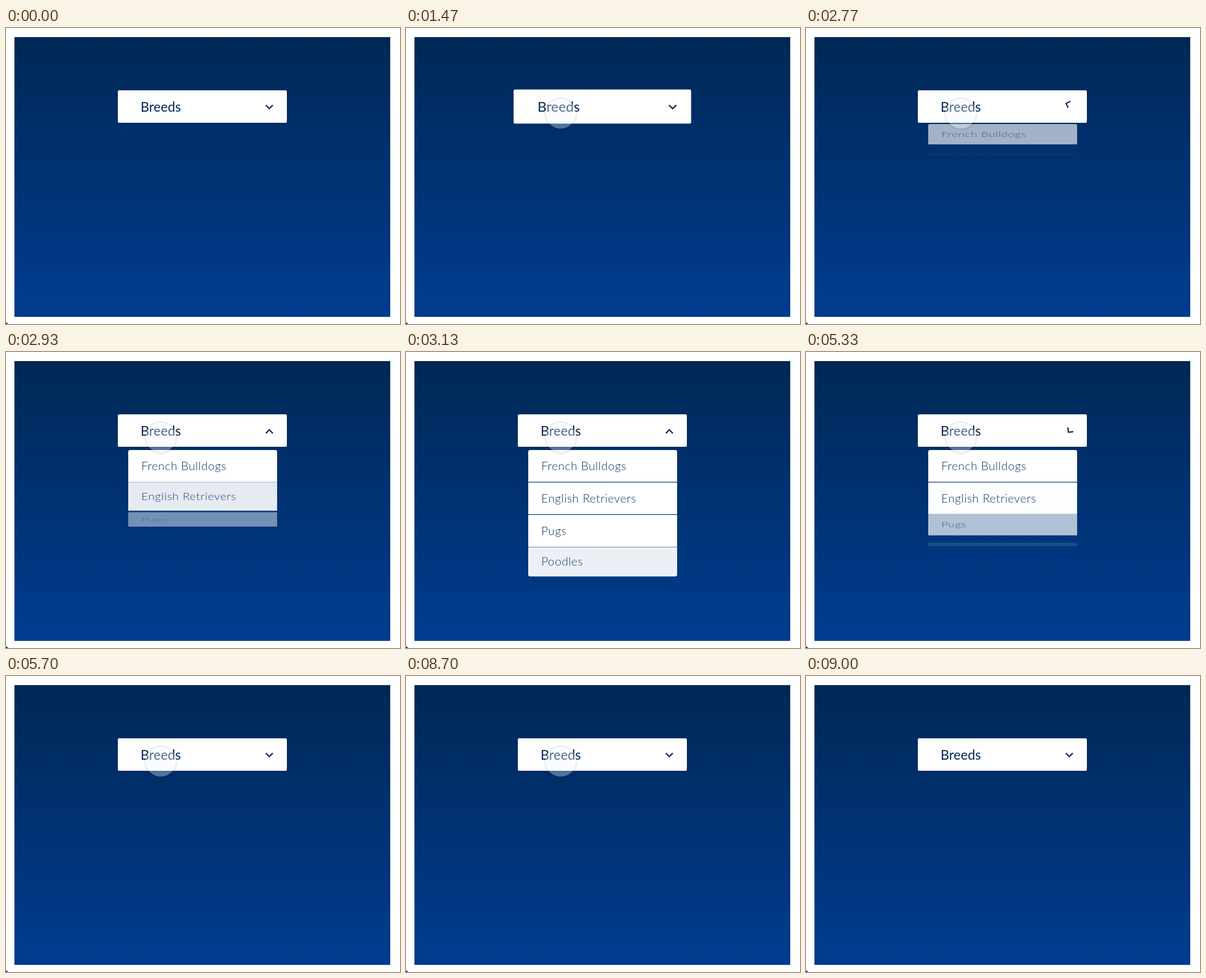
Write an HTML page with a canvas that moves like this. It is 606 px wide and 456 px high and loops after 9.43 s.

```html
<!DOCTYPE html>
<html lang="en">
<head>
<meta charset="utf-8">
<title>Breeds menu</title>
<style>
  html, body { margin: 0; width: 100%; height: 100%; overflow: hidden; background: #fff; }
  canvas { display: block; }
</style>
</head>
<body>
<canvas id="stage" width="606" height="456"></canvas>
<script>
const ctx = document.getElementById('stage').getContext('2d');
const LOOP = 9430, ENTER = 830, OPEN = 2570, CLOSE = 5070, LEAVE = 8700;
const ITEMS = ['French Bulldogs', 'English Retrievers', 'Pugs', 'Poodles'];
const NAVY = '#002856';

const backdrop = ctx.createLinearGradient(0, 14, 0, 445);
backdrop.addColorStop(0, '#002855');
backdrop.addColorStop(1, '#003c90');

const phase = (t, start, length) => Math.min(1, Math.max(0, (t - start) / length));
const outSine = x => Math.sin(x * Math.PI / 2);
const inOut = x => x * x * (3 - 2 * x);
const outBack = x => 1 + 2.9 * (x - 1) ** 3 + 1.9 * (x - 1) ** 2;

// Run the drawing inside its own saved state.
function group(draw) {
  ctx.save();
  draw();
  ctx.restore();
}

function box(x, y, w, h, radius) {
  ctx.fillStyle = '#fff';
  ctx.beginPath();
  ctx.roundRect(x, y, w, h, radius);
  ctx.fill();
}

function label(text, x, y, font, color, spacing) {
  ctx.font = font + ' Lato, "Open Sans", sans-serif';
  ctx.letterSpacing = spacing + 'px';
  ctx.fillStyle = color;
  ctx.fillText(text, x, y);
}

function drawStage() {
  ctx.fillStyle = '#fff';
  ctx.fillRect(0, 0, 606, 456);
  ctx.fillStyle = backdrop;
  ctx.fillRect(13, 14, 578, 431);
  ctx.fillStyle = '#333';
  ctx.beginPath();
  ctx.moveTo(0, 453.5);
  ctx.quadraticCurveTo(2, 454, 3.5, 456);
  ctx.lineTo(0, 456);
  ctx.fill();
}

// Items unfold downwards one after another; closing runs the same clock back.
function drawItems(t) {
  const clock = t < CLOSE ? t - OPEN : CLOSE + 665 - t;
  ITEMS.forEach((text, i) => {
    const p = outSine(phase(clock, 100 + 96 * i, 230));
    if (!p) return;
    group(() => {
      ctx.globalAlpha = p;
      ctx.translate(188, 151 + 50 * i - 8 * (1 - p));
      ctx.scale(1, p);
      box(0, 0, 229, 49, i === 0 ? [3, 3, 0, 0] : i === 3 ? [0, 0, 3, 3] : 0);
      label(text, 20, 31, '300 18px', '#0b336a', 0.5);
    });
  });
}

function drawChevron(t) {
  const opening = phase(t, OPEN, 330);
  const turn = opening - phase(t, CLOSE, 330);
  const lift = Math.sin(opening * Math.PI);
  group(() => {
    ctx.translate(405 - 3.2 * lift, 122 - 5.5 * lift);
    ctx.rotate(turn * Math.PI);
    ctx.strokeStyle = NAVY;
    ctx.lineWidth = 2;
    ctx.beginPath();
    ctx.moveTo(-5.3, -3.2);
    ctx.lineTo(0, 2.1);
    ctx.lineTo(5.3, -3.2);
    ctx.stroke();
  });
}

function drawButton(t) {
  const hover = outBack(phase(t, 1130, 340)) - inOut(phase(t, OPEN, 190));
  const scale = 1 + 0.05 * hover;
  group(() => {
    ctx.translate(302, 121);
    ctx.scale(scale, scale);
    ctx.translate(-302, -121);
    box(172, 96, 260, 50, 2);
    label('Breeds', 207, 129, '400 20.5px', NAVY, 0);
    drawChevron(t);
  });
}

function drawTouch(t) {
  const near = inOut(phase(t, ENTER, 500)) - inOut(phase(t, LEAVE, 300));
  if (near <= 0) return;
  group(() => {
    ctx.translate(-32 + 270 * near, 486 - 354.5 * near);
    const shade = ctx.createRadialGradient(0, 0.5, 22.5, 0, 0.5, 26);
    shade.addColorStop(0, 'rgba(0,0,0,0)');
    shade.addColorStop(0.4, 'rgba(0,0,0,.1)');
    shade.addColorStop(1, 'rgba(0,0,0,0)');
    ctx.fillStyle = shade;
    ctx.fillRect(-28, -28, 56, 56);
    ctx.fillStyle = 'rgba(244,246,250,.34)';
    ctx.beginPath();
    ctx.arc(0, 0, 23.5, 0, 2 * Math.PI);
    ctx.fill();
  });
}

function frame(now) {
  const t = now % LOOP;
  drawStage();
  drawItems(t);
  drawButton(t);
  drawTouch(t);
  requestAnimationFrame(frame);
}
requestAnimationFrame(frame);
</script>
</body>
</html>
```
